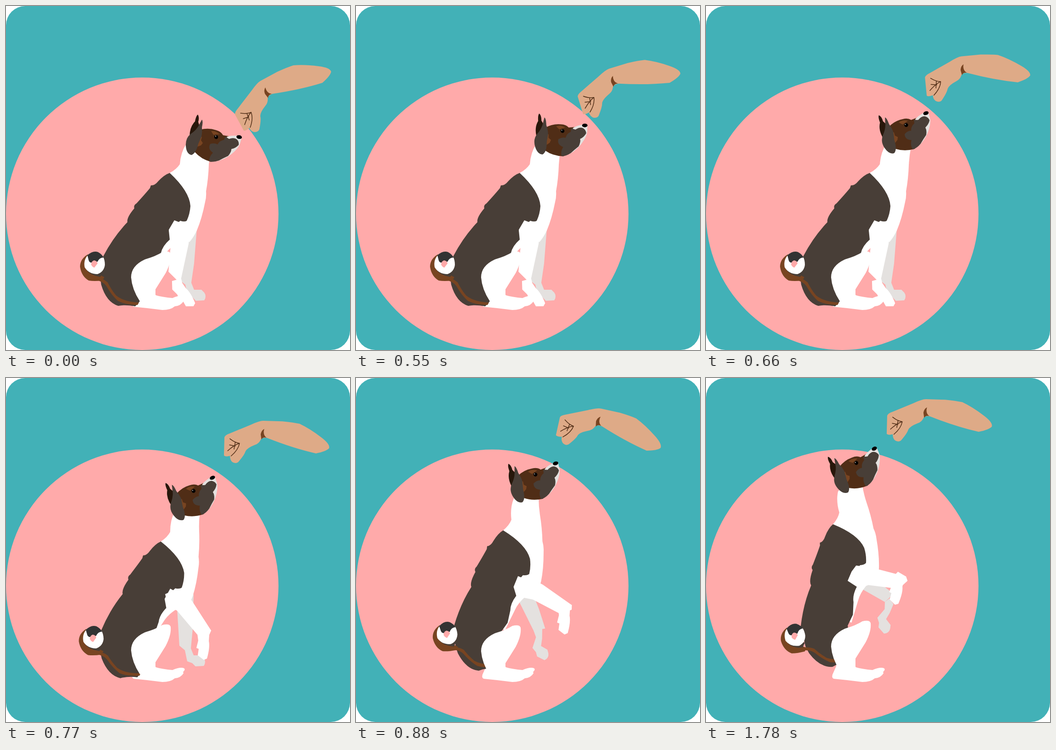
These frames come from a looping animation (748x748 px, 2310 ms). An HTML page:

```html
<!DOCTYPE html>
<html lang="en">
<head>
<meta charset="utf-8">
<title>Dog following a treat</title>
<style>
  html, body { margin: 0; width: 100%; height: 100%; overflow: hidden; background: #fff; }
  svg { display: block; width: 100vw; height: 100vh; }
  .teal { fill: #42b1b7; }
  .pink { fill: #faa; }
  .white { fill: #fff; }
  .coat { fill: #483e37; }
  .brown { fill: #784421; }
  .face { fill: #502d16; }
  .inner { fill: #28170b; }
  .shade { fill: #e4e1df; }
  .skin { fill: #deaa87; }
  .lines { fill: none; stroke: #502d16; stroke-width: 1.5; stroke-linecap: round; stroke-linejoin: round; }
</style>
</head>
<body>
<svg viewBox="0 0 748 748">
  <rect class="teal" width="748" height="748" rx="42"/>
  <circle class="pink" cx="296.3" cy="451.7" r="296.2"/>

  <g id="farLeg" class="shade">
    <path id="farUpper" d="M372 500L377 582L402 588L406 545L408 470Z"/>
    <path id="farLower" d="M377 570V582L389 592L394 616L405 620L412 627L430 626Q436 617 430 609L424 603H408L402 588L392 570Z"/>
  </g>
  <path class="white" d="M284 612L283 627L275 645Q273 653 278 654Q310 657 340 661Q358 661 367 653Q380 652 386 642L385 639Q391 634 387 631Q378 628 362 635Q340 633 326 629Q320 624 325 612Z"/>

  <g class="torso">
    <path class="white" d="M356 363Q371 355 378 344Q380 318 392 300L420 288L446 306Q442 325 441 345Q440 375 435 403Q436 415 433 426Q426 462 415 488Q408 503 399 513L375 514Q357 524 347 538L317 577L300 560L350 440Z"/>
    <path class="coat" d="M356 363Q399 403 401 435Q400 452 393 467Q388 470 379 467L374 471L368 467L354 488L356 508Q340 522 337 537L326 562L307 580L291 642L281 653Q260 649 244 652Q218 644 207 606L205 590L211 545Q234 501 264 470Q262 460 279 440Q277 433 284 429Q304 407 313 396L315 390Q323 391 331 381Q344 367 356 363Z"/>
  </g>

  <g id="tail">
    <path class="brown" d="M178 540Q161 550 161 567Q164 588 180 597Q192 599 209 597L214 590L202 583L180 575Z"/>
    <path class="coat" d="M171 564Q175 584 205 589L212 578Z"/>
    <path class="white" d="M179 541Q168 551 171 568Q180 583 199 583Q213 578 215 563Q215 552 211 545L195 540Z"/>
    <path fill="#333" d="M177 542Q189 531 200 535Q209 540 212 547Q203 547 199 556L185 558Q180 557 179 550Z"/>
    <path class="pink" d="M185 562Q186 554 192 553Q199 555 199 560L192 569Q187 567 185 562Z"/>
  </g>

  <path class="torso brown" d="M190 587Q210 591 221 601Q229 617 239 629Q255 643 289 645L286 650Q260 650 243 641Q229 628 219 610Q213 601 203 598Z"/>
  <path id="thigh" class="white" d="M291 642Q274 616 272 590Q272 565 302 551Q326 544 340 535Q356 531 358 539Q360 556 347 581L325 616V635Z"/>

  <g id="nearLeg" class="white">
    <path d="M346 470L366 461L382 458L404 484L446 549L442 558L416 558L372 506L352 493Z"/>
    <path id="nearLower" d="M446 549L442 558L441 572Q444 585 437 610L430 613L417 603L419 589L414 587L418 571L416 556L427 541Z"/>
  </g>

  <g id="head">
    <path class="inner" d="M417 236Q421 241 418 252Q422 264 424 280L400 296Q396 266 411 251Q413 239 417 236Z"/>
    <path class="face" d="M422 269Q440 264 457 270Q468 273 472 281L484 283L490 310L446 339Q424 333 410 317Z"/>
    <path class="shade" d="M481 284Q491 281 503 282L512 288L509 299Q506 307 499 314Q482 332 457 338L470 300Z"/>
    <path class="coat" d="M477 284L485 289Q496 285 502 290Q507 295 506 302Q500 309 490 311Q490 318 483 326Q472 331 463 336Q452 340 442 338Q441 328 450 319Q438 311 444 300Q453 297 460 301Q464 293 474 291Z"/>
    <path class="brown" d="M446 272Q455 270 465 279L451 280ZM420 281L426 285L424 292L428 298L424 303L416 306Z"/>
    <path class="coat" d="M426 247Q429 250 426 264Q427 276 425 284L418 300Q413 321 403 324Q392 321 391 304Q390 287 402 278Q415 269 420 258Z"/>
    <circle cx="457" cy="285" r="4.2"/>
    <circle class="white" cx="456" cy="283" r=".9"/>
    <ellipse cx="507" cy="285" rx="6" ry="4" transform="rotate(12 507 285)"/>
  </g>

  <g id="hand">
    <path class="skin" d="M498 236Q497 231 504 223L534 184Q546 167 553 163L590 143Q612 133 625 129Q650 127 680 131Q705 134 707 143Q705 152 688 167Q640 182 579 191Q569 195 569 201Q570 210 564 217Q552 232 553 240Q555 247 551 268Q548 275 539 274Q532 272 529 265Q522 272 517 271Z"/>
    <path class="brown" d="M564 177Q560 183 563 191L570 200Q570 193 578 191Q567 190 564 177Z"/>
    <path class="lines" d="M510 233Q525 235 533 231Q538 245 531 264M516 245L528 241M532 232Q524 242 519 258M524 234L529 248"/>
  </g>
</svg>

<script>
  const LOOP = 2310, HOLD = 550, STEP = 110;

  // Points the parts turn about, in drawing coordinates.
  const TAIL = [195, 556], NECK = [399, 311], ARM = [688, 167];
  const SHOULDER = [346, 470], KNEE = [446, 549], FAR_KNEE = [377, 582];

  // Angles in degrees; each pose changes only what differs from the sitting one.
  const SIT = {
    lean: 0, shift: [0, 0], nod: 0, stretch: 0, thigh: 0, arm: 0, armAt: ARM,
    nearAt: [366, 466], near: 45, knee: -83,
    farAt: [378, 596], far: 3, farKnee: 0
  };
  const POSES = [
    {},
    { nod: -14, arm: 11.5, armAt: [682, 167] },
    { nod: -31, arm: 23, armAt: [678, 166] },
    { nod: -35, arm: 30, armAt: [674, 164], lean: -4.7, shift: [-3, 5], thigh: 2,
      nearAt: SHOULDER, near: 0, knee: 0, farAt: FAR_KNEE, far: 0 },
    { nod: -29, arm: 41, armAt: [632, 158], lean: -11.3, shift: [5, -4], thigh: 4, stretch: 11,
      nearAt: [347, 458], near: -22, knee: 22, farAt: [386, 549], far: -23, farKnee: 30 },
    { nod: -38.5, arm: 30, armAt: [593, 117], lean: -21, thigh: -6, stretch: 13,
      nearAt: [308, 441], near: -42.5, knee: 50, farAt: [389, 487], far: -57, farKnee: 52 }
  ].map(change => ({ ...SIT, ...change }));

  const move = (x, y) => `translate(${x} ${y}) `;
  const turn = (angle, [x, y]) => `rotate(${angle} ${x} ${y}) `;
  const carry = ([x, y], to) => move(to[0] - x, to[1] - y);

  function place(selector, transform) {
    document.querySelectorAll(selector).forEach(el => el.setAttribute('transform', transform));
  }

  function show(p) {
    const [dx, dy] = p.shift;
    place('.torso', move(dx, dy) + turn(p.lean, TAIL));
    place('#tail', move(dx, dy) + turn(p.lean * 0.4, TAIL));
    place('#head', move(dx, dy - p.stretch) + turn(p.lean, TAIL) + turn(p.nod - p.lean, NECK));
    place('#thigh', move(0, p.thigh));
    place('#nearLeg', carry(SHOULDER, p.nearAt) + turn(p.near, SHOULDER));
    place('#nearLower', turn(p.knee, KNEE));
    place('#farLeg', carry(FAR_KNEE, p.farAt));
    place('#farUpper', turn(p.far, FAR_KNEE));
    place('#farLower', turn(p.farKnee, FAR_KNEE));
    place('#hand', carry(ARM, p.armAt) + turn(p.arm, ARM));
  }

  const start = performance.now();
  let shown;

  function tick() {
    const time = (performance.now() - start) % LOOP;
    const step = Math.floor((time - HOLD) / STEP) + 1;
    const pose = POSES[Math.min(Math.max(step, 0), POSES.length - 1)];
    if (pose !== shown) show(shown = pose);
    requestAnimationFrame(tick);
  }
  tick();
</script>
</body>
</html>
```
